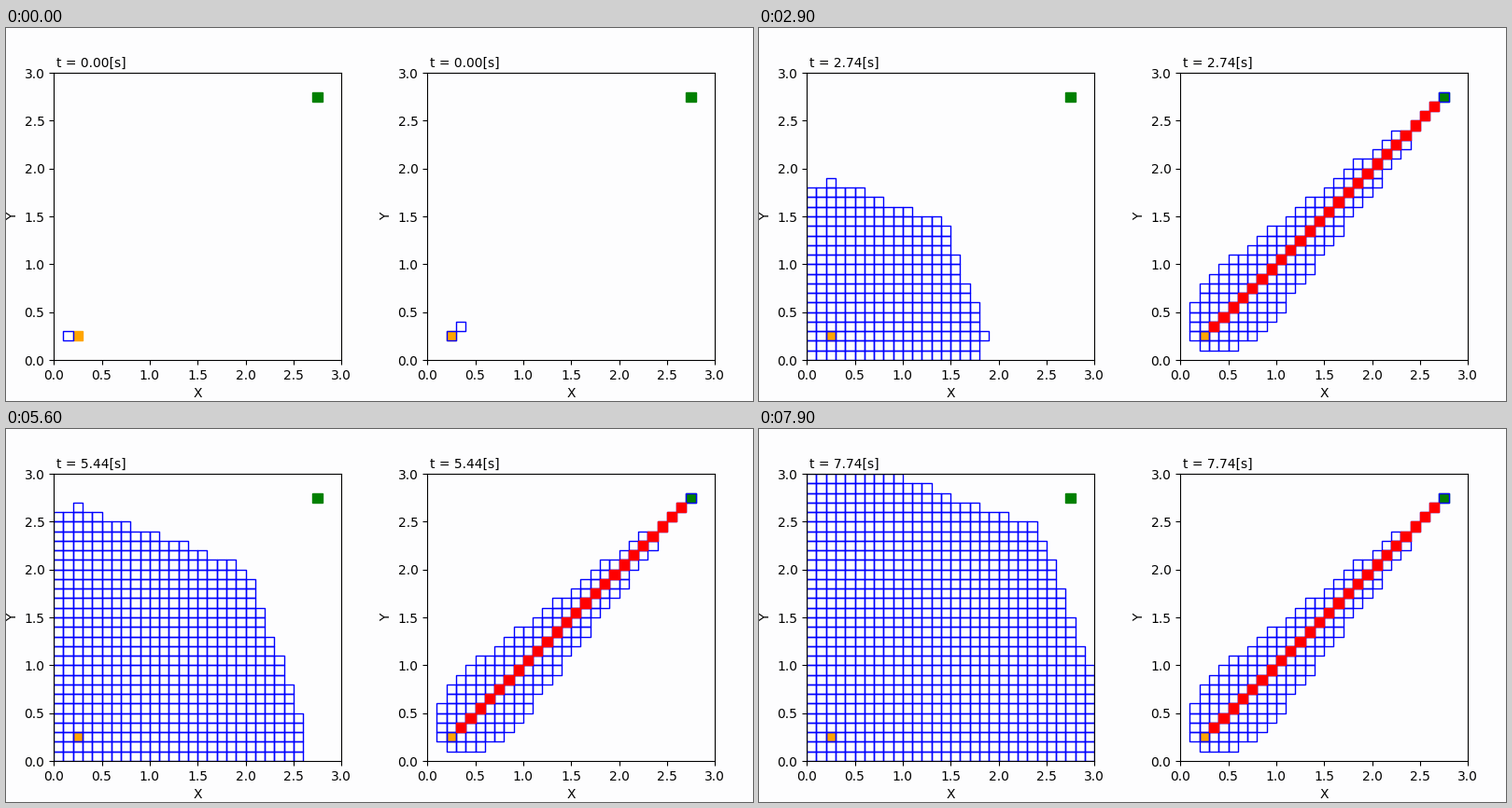
A matplotlib script for the animation above (8000 ms loop, 800 px wide and 400 px high).

```python
import matplotlib.pyplot as plt
from matplotlib.animation import FuncAnimation
from matplotlib.collections import PolyCollection
from matplotlib.patches import Rectangle
import numpy as np

N, CELL = 30, 0.1
START, GOAL = (2, 2), (27, 27)
STRAIGHT, DIAGONAL, HEURISTIC = 11, 15, 9.885
FRAMES, INTERVAL = 80, 100
LAG = 16  # hundredths of a second before the clock starts


def travel(cell):
    """Cost of the shortest eight-way route from the start."""
    dx, dy = abs(cell[0] - START[0]), abs(cell[1] - START[1])
    lo, hi = min(dx, dy), max(dx, dy)
    return DIAGONAL * lo + STRAIGHT * (hi - lo)


def guided(cell):
    left = np.hypot(GOAL[0] - cell[0], GOAL[1] - cell[1])
    return round(travel(cell) + HEURISTIC * left, 6)


def search_order(cost):
    """Cells in the order they are expanded, ending at the goal."""
    cells = [(x, y) for x in range(N) for y in range(N)]
    cells.sort(key=lambda c: (cost(c), c))
    return cells[:cells.index(GOAL) + 1]


def outline(cell):
    x, y = cell[0] * CELL, cell[1] * CELL
    return [(x, y), (x + CELL, y), (x + CELL, y + CELL), (x, y + CELL)]


class Panel:
    def __init__(self, fig, left, cost):
        self.ax = ax = fig.add_axes([left, 0.11, 0.385, 0.77])
        ax.set_facecolor("none")
        ax.set(xlim=(0, 3), ylim=(0, 3), xlabel="X", ylabel="Y")
        ticks = np.arange(0, 3.1, 0.5)
        ax.set_xticks(ticks)
        ax.set_yticks(ticks)
        self.clock = ax.text(0.01, 1.02, "", transform=ax.transAxes)

        self.square(START, "orange", 1)
        self.square(GOAL, "green", 1)
        self.order = search_order(cost)
        self.verts = [outline(c) for c in self.order]
        self.cells = PolyCollection([], facecolors="none", edgecolors="blue",
                                    linewidths=1, zorder=2)
        ax.add_collection(self.cells, autolim=False)
        self.path = [self.square((i, i), "red", 2.2)
                     for i in range(START[0] + 1, GOAL[0])]

    def square(self, cell, color, z):
        corner = (cell[0] * CELL, cell[1] * CELL)
        return self.ax.add_patch(Rectangle(corner, CELL, CELL, fc=color,
                                           ec=color, lw=1, zorder=z))

    def show(self, ticks, first=0):
        count = ticks + 2
        self.cells.set_verts(self.verts[first:count])
        for p in self.path:
            p.set_visible(count >= len(self.order))
        self.clock.set_text(f"t = {ticks / 100:.2f}[s]")


plt.rcParams.update({"font.family": "DejaVu Sans", "font.size": 10})
fig = plt.figure(figsize=(8, 4), dpi=100, facecolor="#fdfdfe")
dijkstra = Panel(fig, 0.064, travel)
astar = Panel(fig, 0.564, guided)


def update(i):
    ticks = max(0, 10 * i - LAG)
    # the plain search outlines its start cell only once it is running
    dijkstra.show(ticks, first=0 if ticks else 1)
    astar.show(ticks)
    return []


anim = FuncAnimation(fig, update, frames=FRAMES, interval=INTERVAL,
                     init_func=lambda: update(0), repeat=True,
                     repeat_delay=0, blit=False)
plt.show()
```
